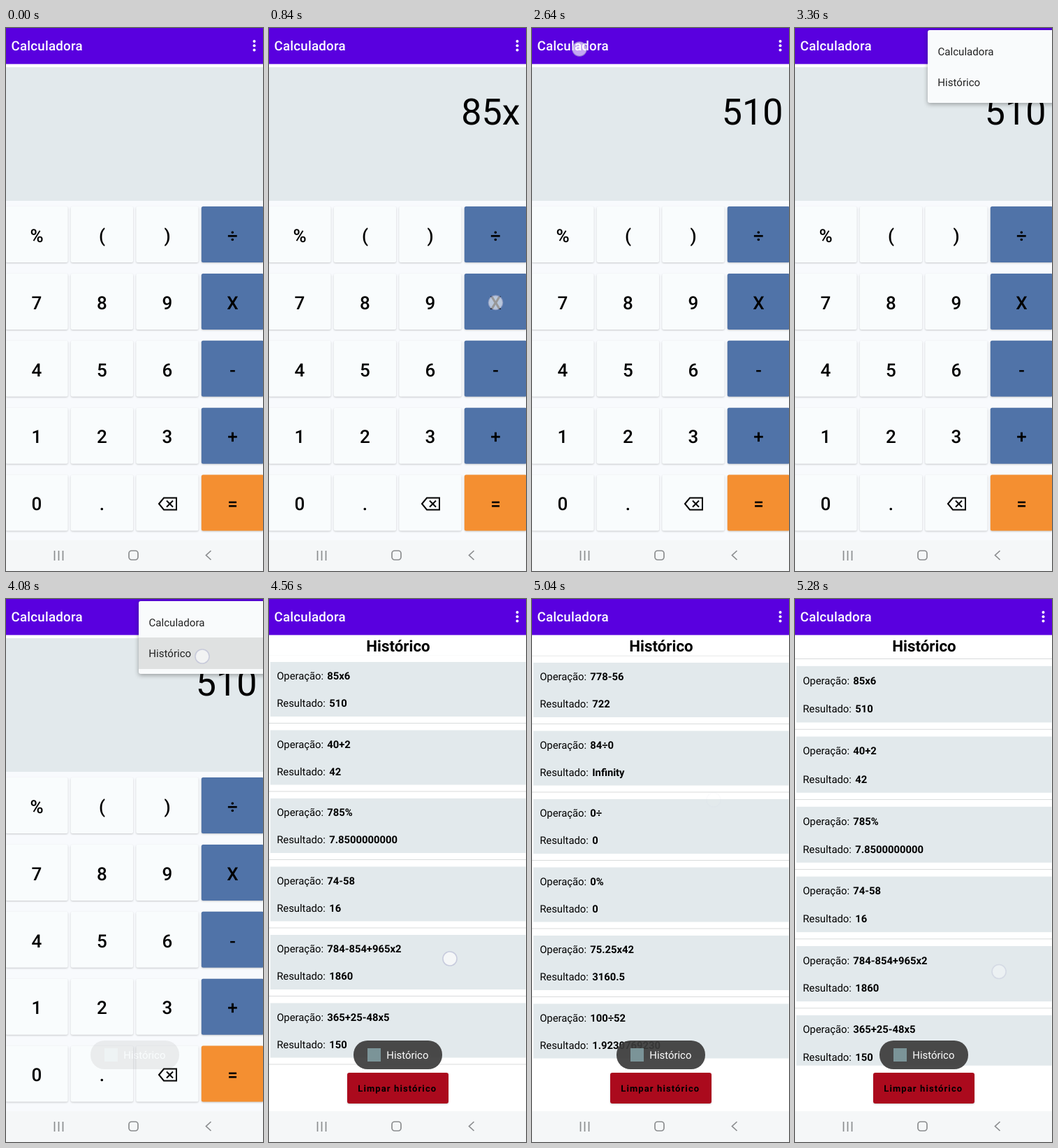
These frames come from a looping animation (368x776 px, 5400 ms). An HTML page:

```html
<!DOCTYPE html>
<html lang="pt">
<head>
<meta charset="utf-8">
<title>Calculadora</title>
<style>
  html, body { margin: 0; width: 100%; height: 100%; overflow: hidden; background: #fff; }
  svg { display: block; width: 100vw; height: 100vh; }
  text { font-family: Roboto, sans-serif; white-space: pre; text-rendering: geometricPrecision; }
  .raised { filter: drop-shadow(0 1px 1px #0003); }
</style>
</head>
<body>
<svg id="stage" viewBox="0 0 368 776"></svg>
<script>
const STEP = 120, LOOP = 5400;
const COLUMN = 93.5, KEY_ROW = 95.9;
const LIST_TOP = 80, LIST_HEIGHT = 586, ROW = 97.5;
const stage = document.getElementById('stage');

function add(parent, tag, attrs = {}, text) {
  const node = document.createElementNS('http://www.w3.org/2000/svg', tag);
  for (const key in attrs) node.setAttribute(key, attrs[key]);
  if (text !== undefined) node.textContent = text;
  parent.append(node);
  return node;
}
const group = (parent, attrs) => add(parent, 'g', attrs);
const box = (parent, x, y, width, height, fill, more) =>
  add(parent, 'rect', { x, y, width, height, fill, ...more });
const label = (parent, x, y, size, text, more) =>
  add(parent, 'text', { x, y, 'font-size': size, ...more }, text);
const show = (node, opacity) => node.setAttribute('opacity', opacity);

// Progress from 0 to 1 between two times
const ramp = (t, from, to) => Math.min(1, Math.max(0, (t - from) / (to - from)));
const easeOut = p => 1 - (1 - p) ** 3;
const easeInOut = p => p * p * (3 - 2 * p);
const mix = (a, b, p) => a + (b - a) * p;

// Calculator screen
const calc = group(stage);
box(calc, 0, 56, 368, 191, '#e2e9ec');
box(calc, 0, 247, 368, 529, '#f8fafd');
const entry = label(calc, 359.5, 138, 52, '', { 'text-anchor': 'end' });
const preview = label(calc, 358.5, 211.5, 31, '510', { 'text-anchor': 'end' });

const keys = ['%()÷', '789X', '456-', '123+', '0.⌫='];
function keyCenter(key) {
  const r = keys.findIndex(line => line.includes(key));
  return [44 + keys[r].indexOf(key) * COLUMN, 296.5 + r * KEY_ROW];
}
for (const key of keys.join('')) {
  const [x, y] = keyCenter(key);
  const operator = x > 300;
  const fill = key === '=' ? '#f48f31' : operator ? '#5073a8' : '#f9fcfd';
  box(calc, x - 44.7, y - 41.5, 89.3, 80, fill, { rx: 2.5, class: 'raised' });
  if (key === '⌫') {
    add(calc, 'path', {
      d: 'M219 680L226 671.5H244V688.5H226ZM230 675.5L239 684.5M239 675.5L230 684.5',
      fill: 'none', stroke: '#000', 'stroke-width': 2
    });
  } else {
    label(calc, x, y + 9.2, 26, key, { 'text-anchor': 'middle', 'font-weight': 500 });
  }
}

// History screen
const history = group(stage);
box(history, 0, 51, 368, 725, '#fff');
label(history, 185, 75, 22.3, 'Histórico', { 'text-anchor': 'middle', 'font-weight': 700 });
box(add(stage, 'clipPath', { id: 'listArea' }), 0, LIST_TOP + 0.7, 368, LIST_HEIGHT, '#000');
const list = group(history, { 'clip-path': 'url(#listArea)' });

const records = [
  ['85x6', '510'], ['40+2', '42'], ['785%', '7.8500000000'], ['74-58', '16'],
  ['784-854+965x2', '1860'], ['365+25-48x5', '150'], ['778-56', '722'],
  ['84÷0', 'Infinity'], ['0÷', '0'], ['0%', '0'], ['75.25x42', '3160.5'],
  ['100÷52', '1.9230769230']
];
const field = (x, name, value) => [
  label(list, 11.2, 0, 14.8, name),
  label(list, x, 0, 14.8, value, { 'font-weight': 700 })
];
const rows = records.map(([operation, result]) => ({
  line: box(list, 0, 0, 368, 1, '#d9dbdc'),
  card: box(list, 2, 0, 365.5, 78, '#e2e9ec'),
  upper: field(83.2, 'Operação:', operation),
  lower: field(86.3, 'Resultado:', result)
}));
const scrollEnd = records.length * ROW - LIST_HEIGHT;
box(history, 112, 677, 145, 44, '#ab0a1d', { rx: 3, class: 'raised' });
label(history, 127.3, 704, 13, 'Limpar histórico', { 'font-weight': 700, 'letter-spacing': 1.1 });

// App bar and navigation bar
box(stage, 0, 0, 368, 51.5, '#5900df');
label(stage, 7.5, 32, 18.7, 'Calculadora',
  { fill: '#fff', 'font-weight': 500, 'letter-spacing': 0.23 });
for (let i = -1; i <= 1; i++) {
  add(stage, 'circle', { cx: 355.5, cy: 25.2 + i * 6.2, r: 2, fill: '#fff' });
}
box(stage, 0, 732, 368, 44, '#f5f7f8');
const navStyle = { fill: 'none', stroke: '#8b8d8f', 'stroke-width': 1.7 };
add(stage, 'path', {
  d: 'M69.5 747V761M75.5 747V761M81.5 747V761M293.5 747L286.5 753.5L293.5 760', ...navStyle
});
box(stage, 176, 747, 13, 13, 'none', { rx: 4, ...navStyle });

// Overflow menu, toast and touch marker
const menu = group(stage);
box(menu, 190, 3, 190, 104, '#f9fbfc', { rx: 3, style: 'filter:drop-shadow(0 2px 3px #0005)' });
const pressed = box(menu, 190, 55, 178, 45, '#dfe1e1');
label(menu, 204.5, 38.5, 15.1, 'Calculadora', { fill: '#222' });
label(menu, 204.3, 83, 15.1, 'Histórico', { fill: '#222' });

const toast = group(stage);
box(toast, 121, 631, 127, 41, '#3b3b3b', { rx: 20, 'fill-opacity': 0.92 });
box(toast, 141, 642, 19, 19, '#7b9498');
label(toast, 168.3, 657, 14.9, 'Histórico', { fill: '#fff' });

const touch = add(stage, 'circle', {
  r: 10, fill: '#fff', 'fill-opacity': 0.65,
  stroke: '#b0b4d0', 'stroke-opacity': 0.6, 'stroke-width': 1.6
});

// Gestures: a finger moves between two points and fades as it lifts
const typed = '85x6';
const tapStart = i => 240 + 290 * i;
const gesture = (start, end, from, to = from) => ({ start, end, from, to });
const gestures = [
  ...[...typed].map((key, i) =>
    gesture(tapStart(i), tapStart(i) + 240, keyCenter(key.toUpperCase()))),
  gesture(1400, 2000, [327, 663]),
  gesture(2520, 2880, [30, 30], [84, 30]),
  gesture(2960, 3200, [355, 27]),
  gesture(3800, 4300, [281, 82]),
  gesture(4560, 5055, [259, 514], [260, 287]),
  gesture(5160, 5400, [286, 410], [293, 550])
];

function moveTouch(t) {
  const active = gestures.find(g => t >= g.start && t < g.end);
  show(touch, active ? ramp(active.end - t, 0, 240) : 0);
  if (!active) return;
  const { start, end, from, to } = active;
  const p = easeOut(ramp(t, start, end));
  touch.setAttribute('cx', mix(from[0], to[0], p));
  touch.setAttribute('cy', mix(from[1], to[1], p));
}

// Overscroll pulls rows down, more strongly further from the top edge
function stretch(y, amount) {
  const u = y - LIST_TOP;
  return y + amount * (5.5 + 0.0358 * u - 0.000024 * u * u);
}

function layoutList(offset, pull) {
  rows.forEach(({ line, card, upper, lower }, i) => {
    const place = y => stretch(LIST_TOP + i * ROW - offset + y, pull);
    line.setAttribute('y', place(0) - 0.5);
    card.setAttribute('y', place(10));
    card.setAttribute('height', place(88) - place(10));
    upper.forEach(node => node.setAttribute('y', place(30) + 5.3));
    lower.forEach(node => node.setAttribute('y', place(69) + 5.3));
  });
}

function render(t) {
  const count = Math.max(0, Math.floor((t - tapStart(0)) / 290) + 1);
  const solved = t >= 1800;
  entry.textContent = solved ? '510' : typed.slice(0, count);
  show(preview, count >= typed.length && !solved ? 1 : 0);
  show(menu, ramp(t, 3000, 3240) * (1 - ramp(t, 4080, 4320)));
  show(pressed, t >= 3840 ? 1 : 0);
  show(history, t >= 4200 ? 1 : 0);
  show(toast, ramp(t, 4050, 4410));
  const down = easeInOut(ramp(t, 4560, 5040));
  const back = easeInOut(ramp(t, 5040, 5280));
  layoutList(scrollEnd * (down - back), ramp(t, 5160, 5280));
  moveTouch(t);
}

const begin = performance.now();
function tick() {
  const elapsed = (performance.now() - begin) % LOOP;
  render(Math.floor(elapsed / STEP) * STEP);
  requestAnimationFrame(tick);
}
tick();
</script>
</body>
</html>
```
